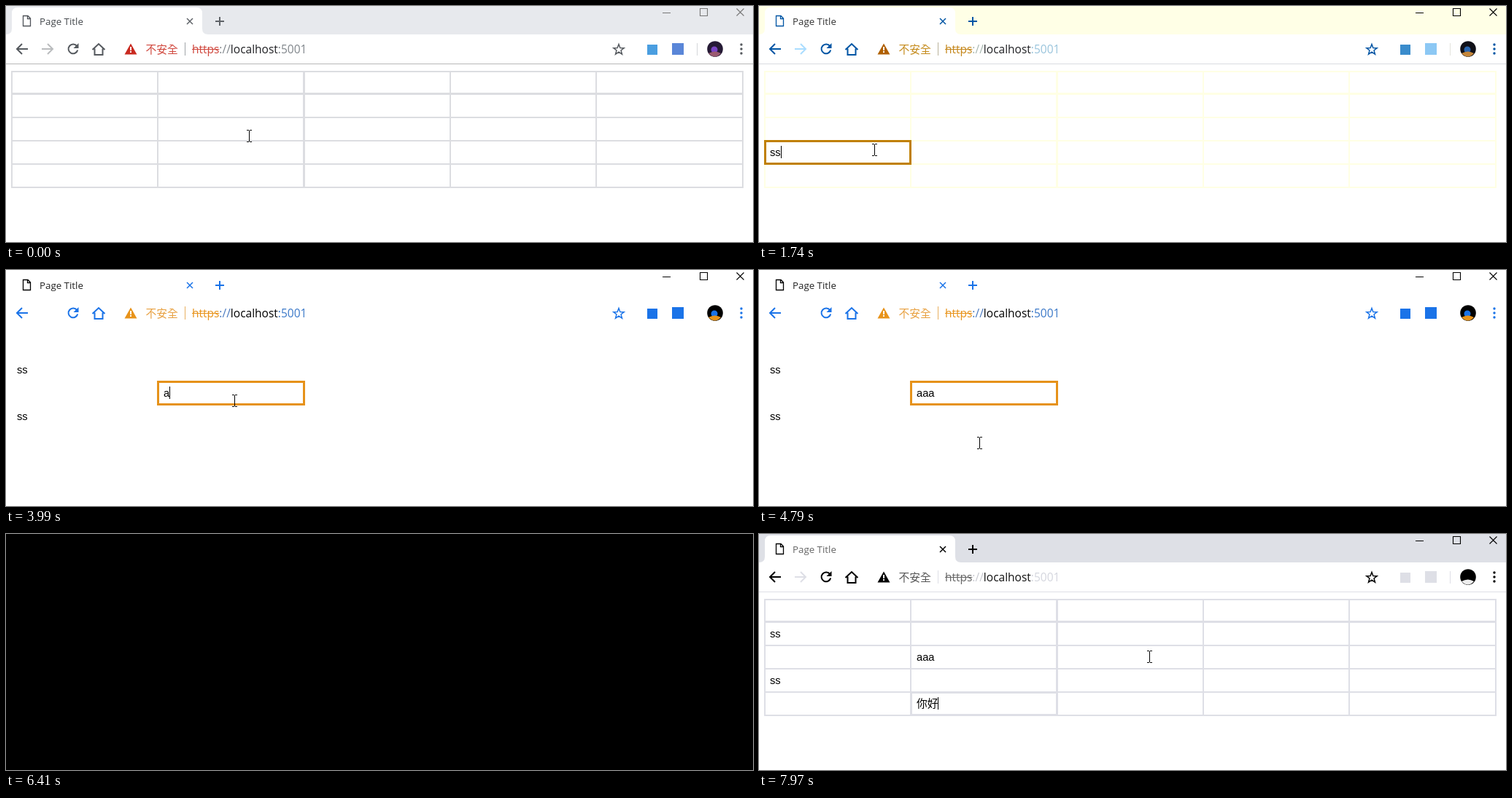
An HTML page with a canvas that plays this animation: 1024x324 px, repeating every 8000 ms.

```html
<!DOCTYPE html>
<html lang="zh-Hant">
<head>
<meta charset="utf-8">
<title>Page Title</title>
<style>
  html, body { margin: 0; width: 100%; height: 100%; overflow: hidden; background: #fff; }
  canvas { display: block; }
</style>
</head>
<body>
<canvas id="stage" width="1024" height="324"></canvas>
<script>
const ctx = document.getElementById('stage').getContext('2d');
const LOOP = 8000, BLINK = 500, BLACKOUT = [6410, 6460];
const UI = '"Open Sans", "Noto Sans", sans-serif';
const CELL = '14.7px "Liberation Sans", "Noto Sans CJK TC", "Noto Sans CJK", sans-serif';
const CJK = '14.8px "Noto Sans CJK TC", "Noto Sans CJK", sans-serif';

// Colour moods of the window
const plain = {
  bar: '#e7e9ed', title: '#45494d', doc: '#50545a', close: '#5f6368', plus: '#5f6368', win: '#777',
  icon: '#55595e', forward: '#babcbe', warn: '#c92a20', unsafe: '#d0473d', scheme: '#d0473d',
  slashes: '#80868b', host: '#202124', port: '#80868b', sep: '#a0a4a8', edge: '#b8b8b8',
  grid: '#dcdde1', badge: '#4a9ee0', tool: '#5a86d8', split: '#d4d6da',
  face: ['#251a35', '#7a45c4', '#9a5a70'], focus: '#c08000'
};
const cream = {
  ...plain, bar: '#ffffe6', title: '#333333', doc: '#0055a4', close: '#0055a4', plus: '#0055a4', win: '#000',
  icon: '#0055a4', forward: '#aaddff', warn: '#b06000', unsafe: '#c48a1a', scheme: '#c4861a',
  slashes: '#a8b8b0', port: '#99c4dc', sep: '#b9b29a', edge: '#dadce0', grid: '#ffffe4',
  badge: '#3a8ccc', tool: '#8cc8f4', split: '#e4e4dc', face: ['#101018', '#2a66b0', '#c4863a']
};
const amber = { ...cream, tool: '#2a7cc8', focus: '#e6921a' };
const vivid = {
  ...amber, bar: '#fff', title: '#222', doc: '#000', close: '#1a73e8', plus: '#1a73e8',
  icon: '#1a73e8', forward: '#fff', warn: '#e8931a', unsafe: '#e8a040', scheme: '#e8931a',
  slashes: '#4a7ac0', host: '#000', port: '#3a78c8', sep: '#e8b060', edge: '#fff', grid: '#fff',
  badge: '#1a73e8', tool: '#1a73e8', split: '#fff', face: ['#000', '#1a73e8', '#e8931a']
};
const pale = {
  ...vivid, title: '#33334d', close: '#000', plus: '#000033', icon: '#000033', forward: '#9be0ff',
  warn: '#ffc580', unsafe: '#ffc580', scheme: '#f4bc7c', slashes: '#e8c090', port: '#9be0ff',
  sep: '#ffc580', edge: '#d2d2d2', badge: '#9be0ff', tool: '#9be0ff', split: '#ffe0bc',
  face: ['#000026', '#000026', '#ffc580'], focus: '#ffc57d'
};
const grey = {
  ...plain, bar: '#dee0e6', title: '#666', doc: '#000', close: '#000', plus: '#000', win: '#000',
  icon: '#000', forward: '#dedfe6', warn: '#000', unsafe: '#555', scheme: '#666', slashes: '#c8c9d0',
  host: '#111', port: '#d4d6de', sep: '#dedfe6', edge: '#dedfe6', grid: '#dedfe6', badge: '#dedfe6',
  tool: '#dedfe6', split: '#dedfe6', face: ['#000', '#000', '#eee'], focus: '#dedfe6'
};
const moods = [[0, plain], [1210, cream], [2290, amber], [3510, vivid], [5320, pale], [7320, grey]];

// [time, row, column, text, composing from]
const edits = [
  [1210, 3, 0, ''], [1550, 3, 0, 's'], [1740, 3, 0, 'ss'],
  [2290, 1, 0, ''], [2400, 1, 0, 's'], [2540, 1, 0, 'ss'],
  [3510, 2, 1, ''], [3990, 2, 1, 'a'], [4060, 2, 1, 'aa'], [4190, 2, 1, 'aaa'],
  [4890, 4, 1, ''], [5320, 4, 1, 'ㄋ', 0], [5500, 4, 1, 'ㄋ一', 0], [5920, 4, 1, '你', 0],
  [6230, 4, 1, '你ㄏ', 0], [6320, 4, 1, '你ㄏㄠ', 0], [6460, 4, 1, '你好', 0], [6640, 4, 1, '你好']
];

// [start, end, steps, x, y]
const start = [333, 178];
const moves = [
  [590, 840, 8, 158, 197], [1800, 2230, 8, 178, 148], [2660, 3320, 11, 313, 179],
  [4270, 4790, 9, 302, 237], [7320, 7400, 3, 325, 228], [7680, 7970, 6, 535, 168]
];

const colX = i => Math.floor(7 + 200.4 * i);
const rowY = i => Math.floor(89 + 31.8 * i);

function rect(x, y, w, h, color) {
  ctx.fillStyle = color;
  ctx.fillRect(x, y, w, h);
}
function stroke(d, color, width = 2) {
  ctx.strokeStyle = color;
  ctx.lineWidth = width;
  ctx.stroke(new Path2D(d));
}
function fill(d, color) {
  ctx.fillStyle = color;
  ctx.fill(new Path2D(d));
}
function disc(x, y, r, color) {
  ctx.fillStyle = color;
  ctx.beginPath();
  ctx.arc(x, y, r, 0, 7);
  ctx.fill();
}
function text(str, x, y, color, font) {
  ctx.font = font;
  ctx.fillStyle = color;
  ctx.fillText(str, x, y);
  return x + ctx.measureText(str).width;
}

function drawTabs(c) {
  rect(0, 0, 1024, 39, c.bar);
  fill('M0 39Q8 39 8 31V10Q8 2 16 2H261Q269 2 269 10V31Q269 39 277 39Z', '#fff');
  stroke('M23.5 13.5H30L33.5 17V27.5H23.5ZM29.5 13.5V17.5H33.5', c.doc, 1.3);
  text('Page Title', 46, 26, c.title, '13.3px ' + UI);
  stroke('M248 17L256 25M256 17L248 25', c.close, 1.5);
  stroke('M287 21H299M293 15V27', c.plus);
  stroke('M900 9.5H911M951.5 3.5H961.5V13.5H951.5ZM1001.5 3.5L1011.5 13.5M1011.5 3.5L1001.5 13.5', c.win, 1.1);
}

function drawAddress(c) {
  fill('M171 51.5L179.5 66.5H162.5Z', c.warn);
  rect(170, 56, 2, 5, '#fff');
  rect(170, 62, 2, 2, '#fff');
  text('不安全', 191.5, 64.5, c.unsafe, CJK);
  rect(245, 50, 1, 18, c.sep);
  const font = '15.5px ' + UI;
  let x = text('https', 255, 65, c.scheme, font);
  rect(255, 59, x - 255, 1, c.scheme);
  x = text('://', x, 65, c.slashes, font);
  x = text('localhost', x, 65, c.host, font);
  text(':5001', x, 65, c.port, font);
}

function drawToolbar(c) {
  rect(0, 39, 1024, 40, '#fff');
  rect(0, 79, 1024, 1, c.edge);
  stroke('M30 59H15.5M22 52L15 59L22 66', c.icon);
  stroke('M49 59H63.5M57 52L64 59L57 66', c.forward);
  stroke('M97.2 55.2A6.4 6.4 0 1 0 98.2 60.5', c.icon);
  fill('M99.5 51V58H92.5Z', c.icon);
  stroke('M118.5 60L127 52L135.5 60M121.5 58.5V67H132.5V58.5', c.icon);
  drawAddress(c);

  let star = '';
  for (let i = 0; i < 10; i++) {
    const r = i % 2 ? 3.2 : 7.6, a = i * Math.PI / 5;
    star += (i ? 'L' : 'M') + (840 + r * Math.sin(a)) + ' ' + (60 - r * Math.cos(a));
  }
  stroke(star + 'Z', c.icon, 1.5);
  rect(879, 53, 14, 14, c.badge);
  rect(913, 51, 16, 16, c.tool);
  rect(947, 51, 1, 17, c.split);
  disc(972, 59, 10.8, c.face[0]);
  disc(971, 60, 4.5, c.face[1]);
  fill('M963 65Q972 60 980 65Q972 74 963 65Z', c.face[2]);
  for (const y of [53, 59, 65]) disc(1008, y, 1.7, c.icon);
}

function drawGrid(c) {
  for (let i = 0; i < 6; i++) {
    const fatX = i === 2 ? 1 : 0, fatY = i === 1 ? 1 : 0;
    rect(colX(i), 89, 2 + fatX, 161, c.grid);
    rect(7, rowY(i) - fatY, 1004, 2 + fatY, c.grid);
  }
}

function drawCells(t, c) {
  const done = edits.filter(e => e[0] <= t);
  if (!done.length) return;
  const cells = new Map(done.map(e => [e[1] + ',' + e[2], e]));
  const last = done[done.length - 1];
  for (const e of cells.values()) {
    const [time, row, col, str, composing] = e;
    const x = colX(col), y = row === 1 ? 120 : rowY(row);
    const tx = x + 8 + col;
    if (e === last) {
      ctx.strokeStyle = c.focus;
      ctx.lineWidth = 3;
      ctx.strokeRect(x + 1.5, y + 1.5, 199 + col, 31);
    }
    const end = text(str, tx, y + 22, '#000', CELL);
    if (e !== last) continue;
    if (composing !== undefined) rect(tx + 1, y + 25, end - tx - 2, 1, '#222');
    if (Math.floor((t - time) / BLINK) % 2 === 0) rect(Math.round(end), y + 8, 1, 17, '#000');
  }
}

function pointerAt(t) {
  let [x, y] = start;
  for (const [from, to, steps, nx, ny] of moves) {
    if (t < from) break;
    const step = Math.floor((t - from) / (to - from) * (steps - 1) + 1e-6) + 1;
    const p = Math.min(1, step / steps), k = p * p * (3 - 2 * p);
    x += (nx - x) * k;
    y += (ny - y) * k;
  }
  return [Math.round(x), Math.round(y)];
}

function drawPointer(t) {
  const [x, y] = pointerAt(t);
  rect(x, y - 7, 1, 15, '#000');
  for (const sy of [y - 8, y + 8]) {
    rect(x - 3, sy, 3, 1, '#000');
    rect(x + 1, sy, 3, 1, '#000');
  }
}

function draw(t) {
  if (t >= BLACKOUT[0] && t < BLACKOUT[1]) {
    rect(0, 0, 1024, 324, '#000');
    return;
  }
  const c = moods.filter(m => m[0] <= t).pop()[1];
  rect(0, 0, 1024, 324, '#fff');
  drawTabs(c);
  drawToolbar(c);
  drawGrid(c);
  drawCells(t, c);
  drawPointer(t);
}

function tick() {
  draw(performance.now() % LOOP);
  requestAnimationFrame(tick);
}
tick();
</script>
</body>
</html>
```
